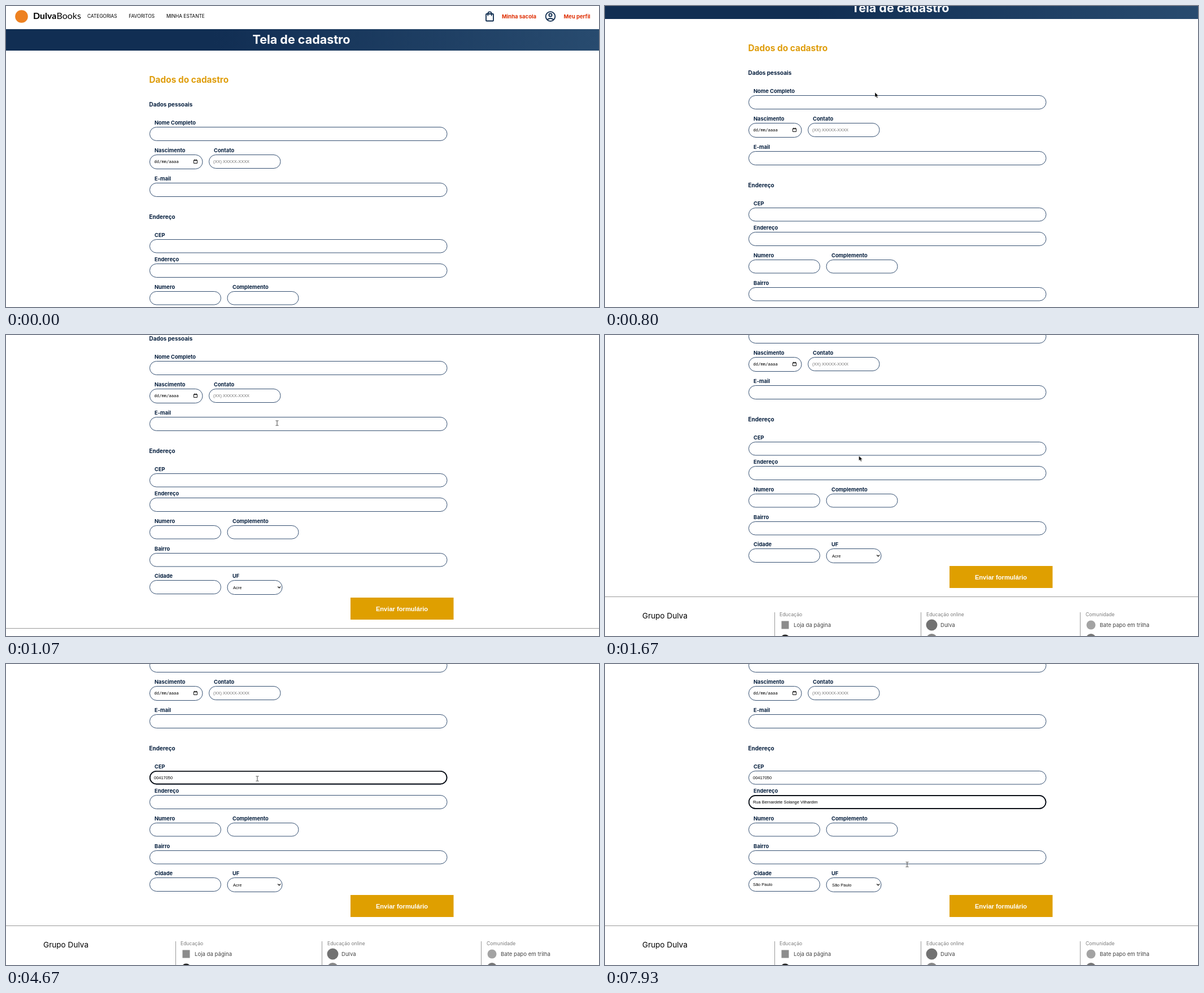
An HTML page that plays this animation: 1050x533 px, repeating every 8000 ms.

```html
<!DOCTYPE html>
<html lang="pt-BR">
<head>
<meta charset="utf-8">
<title>Tela de cadastro</title>
<style>
  html, body { margin: 0; width: 100%; height: 100%; overflow: hidden; background: #fff; }
  svg { display: block; width: 1050px; height: 533px; }
  text { font-family: Inter, "Open Sans", sans-serif; }

  .brand { font: 16px Lato, sans-serif; }
  .nav { font-size: 8.35px; }
  .link { font-size: 9.45px; font-weight: 700; fill: #df2f04; }
  .title { font-size: 21.5px; font-weight: 700; fill: #fff; text-anchor: middle; }
  .section { font-size: 15.4px; font-weight: 700; fill: #df9d0c; }
  .group { font-size: 9.95px; font-weight: 700; fill: #061f3e; }
  .labels { font-size: 9.3px; font-weight: 700; fill: #061f3e; }
  .fields { fill: #fff; stroke: #1f3d62; stroke-width: 0.9; }
  .value { font: 7.45px "Liberation Sans", Arial, sans-serif; fill: #000; }
  .hint { fill: #707070; }
  .date { font: 7.2px "DejaVu Sans Mono", monospace; fill: #000; }
  .send { font: bold 11.15px "Liberation Sans", Arial, sans-serif; fill: #fff; text-anchor: middle; }
  .group-name { font-size: 13.6px; }
  .column { font-size: 8.55px; fill: #7b7b7b; }
  .item { font-size: 9.6px; fill: #444; }
  .icon { fill: none; stroke: #0c2a4d; stroke-width: 1.8; }
  .ring { fill: none; stroke: #0b0f16; stroke-width: 1.8; }

  /* 1% = 80 ms */
  .page, .ring, .typed, .caret, .caret rect, .filled, .before, .arrow, .beam {
    animation: 8s step-end infinite;
  }
  .page { animation-name: scroll; }
  .ring.cep { animation-name: focus-cep; }
  .ring.street { animation-name: focus-street; }
  .typed { animation-name: type; }
  .caret { animation-name: caret; }
  .caret rect { animation-name: blink; }
  .filled { animation-name: fill; }
  .before { animation-name: unfill; }
  .pointer { animation: move 8s linear infinite; }
  .arrow { animation-name: arrow; }
  .beam { animation-name: beam; }

  @keyframes scroll {
    0% { transform: translateY(0); }
    9.95% { transform: translateY(-56px); }
    11.6% { transform: translateY(-112px); }
    13.3% { transform: translateY(-168px); }
    15%, 100% { transform: translateY(-224px); }
  }
  @keyframes focus-cep {
    0% { opacity: 0; }
    22.5% { opacity: 1; }
    75.8%, 100% { opacity: 0; }
  }
  @keyframes focus-street {
    0% { opacity: 0; }
    75.8%, 100% { opacity: 1; }
  }
  @keyframes type {
    0% { clip-path: inset(0 100% 0 0); }
    35.8% { clip-path: inset(0 87.5% 0 0); }
    40.8% { clip-path: inset(0 75% 0 0); }
    42.45% { clip-path: inset(0 62.5% 0 0); }
    45% { clip-path: inset(0 50% 0 0); }
    46.6% { clip-path: inset(0 37.5% 0 0); }
    47.5% { clip-path: inset(0 25% 0 0); }
    49.1% { clip-path: inset(0 12.5% 0 0); }
    51.6%, 100% { clip-path: inset(0); }
  }
  @keyframes caret {
    0% { transform: translate(0, 0); }
    35.8% { transform: translate(4.1px, 0); }
    40.8% { transform: translate(8.3px, 0); }
    42.45% { transform: translate(12.4px, 0); }
    45% { transform: translate(16.6px, 0); }
    46.6% { transform: translate(20.7px, 0); }
    47.5% { transform: translate(24.9px, 0); }
    49.1% { transform: translate(29px, 0); }
    51.6% { transform: translate(33.1px, 0); }
    75.8% { transform: translate(0, 43px); }
    89.1%, 100% { transform: translate(117px, 43px); }
  }
  @keyframes blink {
    0%, 29.1%, 58.3%, 70.8%, 82.5%, 95.8%, 100% { opacity: 0; }
    22.5%, 35.8%, 64.1%, 75.8%, 89.1% { opacity: 1; }
  }
  @keyframes fill {
    0% { opacity: 0; }
    89.1%, 100% { opacity: 1; }
  }
  @keyframes unfill {
    0% { opacity: 1; }
    89.1%, 100% { opacity: 0; }
  }
  @keyframes move {
    0%, 3.4% { transform: translate(341px, 265px); }
    5.8% { transform: translate(530px, 180px); }
    7.5%, 11.6% { transform: translate(478px, 153px); }
    13.3%, 15% { transform: translate(480px, 156px); }
    20% { transform: translate(452px, 220px); }
    22.5%, 70% { transform: translate(445px, 203px); }
    72.5%, 74.2% { transform: translate(453px, 210px); }
    75.8% { transform: translate(480px, 243px); }
    78.4% { transform: translate(560px, 320px); }
    81.6% { transform: translate(593px, 254px); }
    82.5%, 84.2% { transform: translate(595px, 250px); }
    87.5% { transform: translate(597px, 207px); }
    95% { transform: translate(335px, 225px); }
    99.1%, 100% { transform: translate(535px, 355px); }
  }
  @keyframes arrow {
    0%, 11.6%, 17.5%, 21.7%, 81.3%, 96.3%, 100% { opacity: 0; }
    3.375%, 15%, 18.8%, 76.9%, 93.8% { opacity: 1; }
  }
  @keyframes beam {
    0%, 15%, 18.8%, 76.9%, 93.8% { opacity: 0; }
    11.6%, 17.5%, 21.7%, 81.3%, 96.3%, 100% { opacity: 1; }
  }
</style>
</head>
<body>
<svg viewBox="0 0 1050 533" xmlns="http://www.w3.org/2000/svg">
  <defs>
    <linearGradient id="navy" x1="0.35" x2="1">
      <stop stop-color="#112e53"/>
      <stop offset="1" stop-color="#284b6f"/>
    </linearGradient>
  </defs>

  <g class="page">
    <!-- Header -->
    <circle cx="27.5" cy="18.5" r="11.3" fill="#ed8121"/>
    <text class="brand" x="48" y="22.6"><tspan font-weight="700">Dulva</tspan>Books</text>
    <g class="nav">
      <text x="144" y="21.3">CATEGORIAS</text>
      <text x="217.5" y="21.3">FAVORITOS</text>
      <text x="284" y="21.3">MINHA ESTANTE</text>
    </g>
    <g class="icon">
      <rect x="850" y="14" width="13" height="12.5" rx="1"/>
      <path d="M853.3 17.5V13.5a3.2 3.2 0 0 1 6.4 0V17.5"/>
      <circle cx="964" cy="18.5" r="8.3"/>
      <circle cx="964" cy="16" r="2.6"/>
      <path d="M958.3 24.2q5.7-4.4 11.4 0"/>
    </g>
    <text class="link" x="878" y="21.5">Minha sacola</text>
    <text class="link" x="987.5" y="21.5">Meu perfil</text>
    <rect y="41" width="1050" height="38" fill="url(#navy)"/>
    <text class="title" x="523" y="67">Tela de cadastro</text>

    <!-- Form -->
    <text class="section" x="253.5" y="136.3">Dados do cadastro</text>
    <text class="group" x="253.5" y="177.8">Dados pessoais</text>
    <text class="group" x="253.5" y="376.8">Endereço</text>
    <g class="labels">
      <text x="263" y="210.3">Nome Completo</text>
      <text x="263" y="259.2">Nascimento</text>
      <text x="368" y="259.2">Contato</text>
      <text x="263" y="309.1">E-mail</text>
      <text x="263" y="409.3">CEP</text>
      <text x="263" y="452.4">Endereço</text>
      <text x="263" y="501.3">Numero</text>
      <text x="401" y="501.3">Complemento</text>
      <text x="263" y="550.1">Bairro</text>
      <text x="263" y="598.4">Cidade</text>
      <text x="401" y="598.4">UF</text>
    </g>
    <g class="fields">
      <rect x="254.5" y="214.5" width="526.5" height="24" rx="12"/>
      <rect x="254.5" y="263.5" width="93.5" height="25" rx="12.5"/>
      <rect x="359.5" y="263.5" width="126.5" height="24" rx="12"/>
      <rect x="254.5" y="313.5" width="526.5" height="24" rx="12"/>
      <rect x="254.5" y="413.5" width="526.5" height="23.5" rx="11.8"/>
      <rect x="254.5" y="456.5" width="526.5" height="24" rx="12"/>
      <rect x="254.5" y="505.5" width="126" height="23.5" rx="11.8"/>
      <rect x="392" y="505.5" width="126" height="23.5" rx="11.8"/>
      <rect x="254.5" y="554.5" width="526.5" height="23.5" rx="11.8"/>
      <rect x="254.5" y="602.5" width="126" height="24" rx="12"/>
      <rect x="392" y="602.5" width="97" height="25" rx="12.5"/>
    </g>
    <rect class="ring cep" x="254.9" y="413.9" width="525.6" height="22.6" rx="11.3"/>
    <rect class="ring street" x="254.9" y="457" width="525.6" height="23" rx="11.5"/>

    <text class="date" x="262.5" y="278">dd/mm/aaaa</text>
    <path d="M332.5 273h6v5.5h-6zM332.5 273.5h6M334 271.5v1.5M337 271.5v1.5" fill="none" stroke="#111"/>
    <text class="value hint" x="367" y="277.6">(XX) XXXXX-XXXX</text>
    <text class="value typed" x="262" y="427.6">00417050</text>
    <g class="caret"><rect x="262" y="420.5" width="1" height="9"/></g>
    <text class="value before" x="402" y="617.6">Acre</text>
    <g class="filled">
      <text class="value" x="262" y="470.6">Rua Bernardete Solange Vilhardim</text>
      <text class="value" x="262" y="617.2">São Paulo</text>
      <text class="value" x="402" y="617.6">São Paulo</text>
    </g>
    <path d="M481.3 613.5l2.4 2.4 2.4-2.4" fill="none" stroke="#111" stroke-width="1.3"/>

    <rect x="610" y="633" width="182.5" height="39" fill="#df9f00"/>
    <text class="send" x="701" y="656.8">Enviar formulário</text>

    <!-- Footer -->
    <path d="M0 687.5H1050M300.5 715V760M559.5 715V760M841.5 715V760" stroke="#999"/>
    <text class="group-name" x="66" y="726.3">Grupo Dulva</text>
    <g class="column">
      <text x="309" y="722">Educação</text>
      <text x="569" y="722">Educação online</text>
      <text x="851" y="722">Comunidade</text>
    </g>
    <g class="item">
      <text x="334" y="741">Loja da página</text>
      <text x="594" y="741">Dulva</text>
      <text x="876" y="741">Bate papo em trilha</text>
    </g>
    <rect x="312.5" y="730.5" width="13" height="14" fill="#8c8c8c"/>
    <circle cx="578.5" cy="737.5" r="10" fill="#727272"/>
    <circle cx="860.5" cy="737.5" r="8" fill="#a3a3a3"/>
    <circle cx="319" cy="763" r="8.5" fill="#222"/>
    <circle cx="578.5" cy="763" r="10" fill="#888"/>
    <circle cx="860.5" cy="762" r="9" fill="#777"/>
  </g>

  <g class="pointer">
    <path class="arrow" d="M0 0V8.5L2 6.8 3.5 10 4.9 9.4 3.5 6.3H6.2Z" stroke="#fff" stroke-width="0.4"/>
    <path class="beam" d="M-2.5-4.2H-.7L0-3.7.7-4.2H2.5M0-3.7V3.7M-2.5 4.2H-.7L0 3.7.7 4.2H2.5" fill="none" stroke="#333" stroke-width="0.9"/>
  </g>
</svg>
</body>
</html>
```
